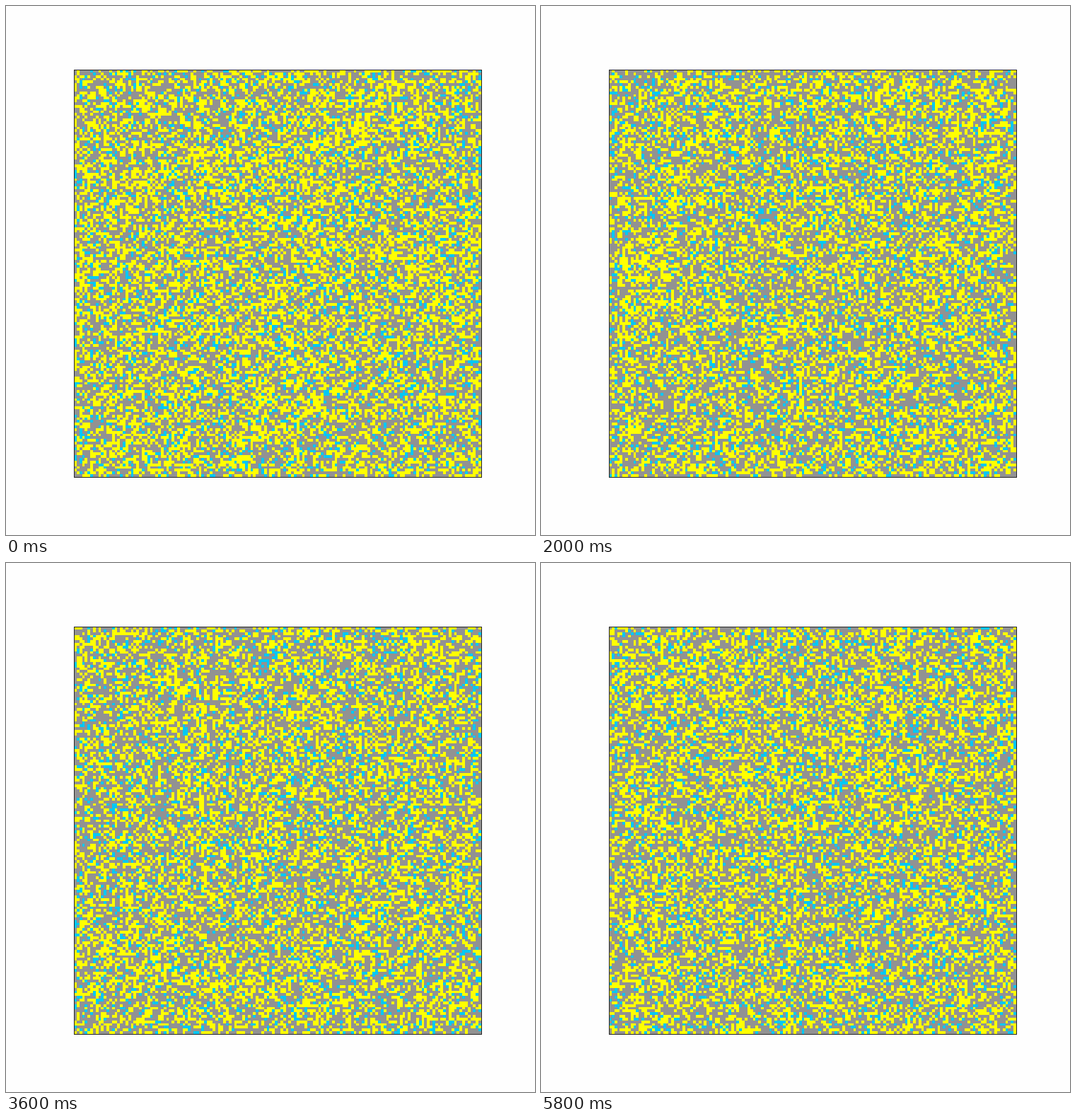
Recreate the animation shown at these times as an HTML page with a canvas. Size 748 by 748 pixels, loop 6000 ms.

```html
<!DOCTYPE html>
<html lang="en">
<head>
<meta charset="utf-8">
<title>Cell lattice</title>
<style>
  html, body { margin: 0; width: 100%; height: 100%; overflow: hidden; background: #fefefe; }
  canvas { display: block; }
</style>
</head>
<body>
<canvas id="stage" width="748" height="748"></canvas>
<script>
const LOOP = 6000, STEP = 200, STATES = 29;
const SIZE = 150, LEFT = 96, TOP = 90, SIDE = 576;
const EMPTY = 0, YELLOW = 1, CYAN = 2;
const COLORS = ['#929292', '#ffff00', '#00c8f5'];
const FIRST_FILL = 0.52, CYAN_SHARE = 0.22;
// Chance of being occupied next, by the number of occupied neighbours.
const OCCUPY = [0.08, 0.22, 0.40, 0.49, 0.53, 0.54, 0.52, 0.48, 0.44];

const ctx = document.getElementById('stage').getContext('2d');
const edge = i => Math.round(i * SIDE / SIZE);

let seed = 20417;
function random() {
  seed = (seed + 0x6d2b79f5) | 0;
  let t = Math.imul(seed ^ (seed >>> 15), 1 | seed);
  t = (t + Math.imul(t ^ (t >>> 7), 61 | t)) ^ t;
  return ((t ^ (t >>> 14)) >>> 0) / 4294967296;
}

function pick(chance) {
  if (random() >= chance) return EMPTY;
  return random() < CYAN_SHARE ? CYAN : YELLOW;
}

function occupiedAround(grid, x, y) {
  let count = 0;
  for (let dy = -1; dy <= 1; dy++) {
    const row = (y + dy + SIZE) % SIZE * SIZE;
    for (let dx = -1; dx <= 1; dx++) {
      if ((dx || dy) && grid[row + (x + dx + SIZE) % SIZE] !== EMPTY) count++;
    }
  }
  return count;
}

function evolve(grid) {
  return grid.map((_, i) =>
    pick(OCCUPY[occupiedAround(grid, i % SIZE, Math.floor(i / SIZE))]));
}

const states = [new Uint8Array(SIZE * SIZE).map(() => pick(FIRST_FILL))];
while (states.length < STATES) states.push(evolve(states[states.length - 1]));

function draw(grid) {
  ctx.fillStyle = '#fefefe';
  ctx.fillRect(0, 0, 748, 748);
  ctx.fillStyle = COLORS[EMPTY];
  ctx.fillRect(LEFT, TOP, SIDE, SIDE);
  for (const kind of [YELLOW, CYAN]) {
    ctx.fillStyle = COLORS[kind];
    grid.forEach((cell, i) => {
      if (cell !== kind) return;
      const col = i % SIZE, row = Math.floor(i / SIZE);
      const x = edge(col), y = edge(row);
      ctx.fillRect(LEFT + x, TOP + y, edge(col + 1) - x, edge(row + 1) - y);
    });
  }
  ctx.strokeStyle = '#262626';
  ctx.lineWidth = 1;
  ctx.strokeRect(LEFT + 0.5, TOP + 0.5, SIDE, SIDE);
}

let shown = -1;
const start = performance.now();
function update() {
  const time = (performance.now() - start) % LOOP;
  // The first state is held for two steps.
  const index = Math.max(0, Math.floor(time / STEP) - 1);
  if (index !== shown) {
    draw(states[index]);
    shown = index;
  }
  requestAnimationFrame(update);
}
update();
</script>
</body>
</html>
```
